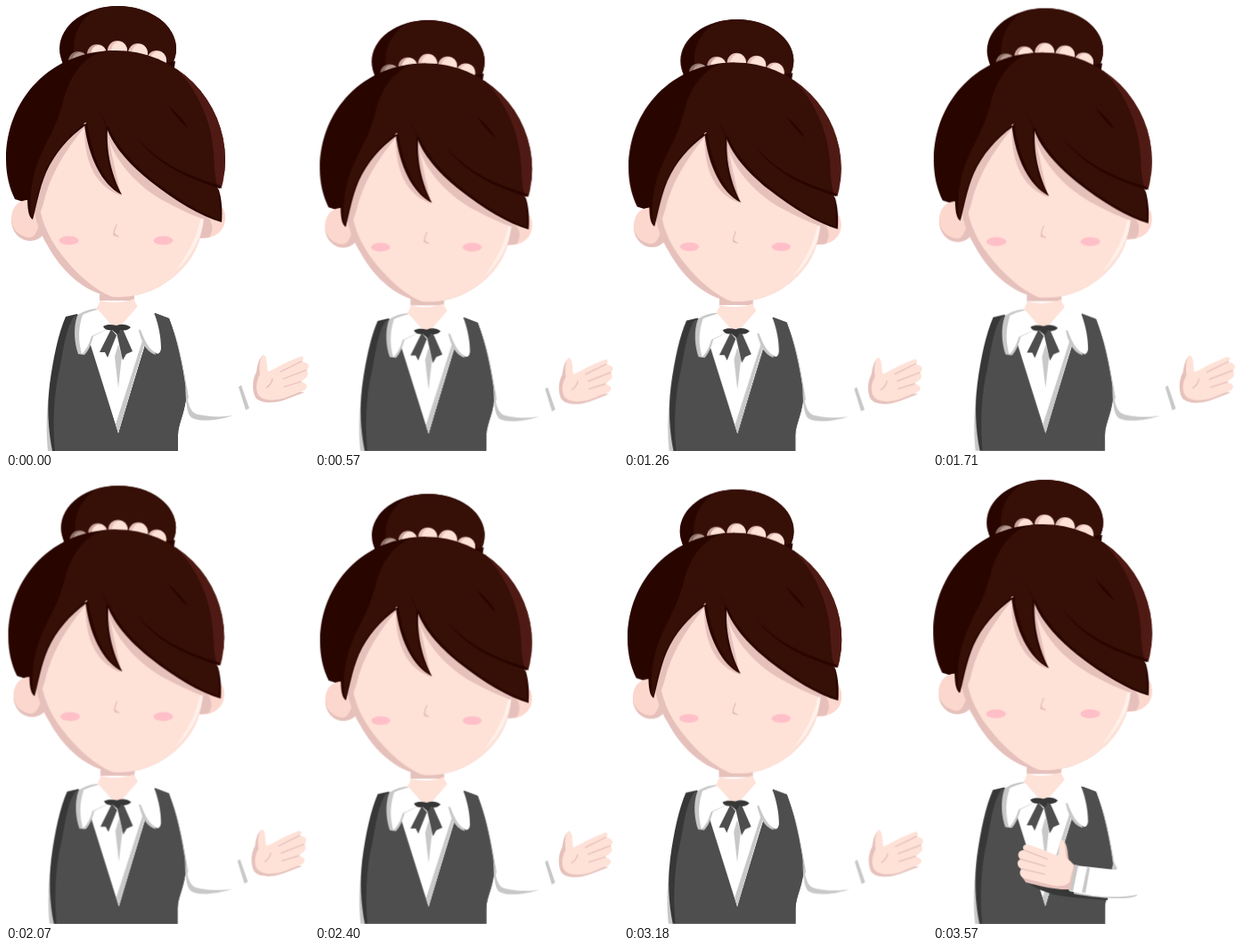
These frames come from a looping animation (340 by 500 pixels, 3600 ms). An HTML page:

```html
<!DOCTYPE html>
<html lang="en">
<head>
<meta charset="utf-8">
<title>Welcoming hostess</title>
<style>
  html, body { margin: 0; width: 100%; height: 100%; overflow: hidden; background: #fff; }
  svg { display: block; width: 340px; height: 500px; }
  #figure { transform-origin: 170px 500px; }
  #chest { opacity: 0; }
  .hair { fill: #360f07; }
  .deep { fill: #290500; }
  .glow { fill: #501a14; }
  .skin { fill: #fee1d7; }
  .ear { fill: #fcd7ce; }
  .blush { fill: #e6c1bc; }
  .vest { fill: #4e4e4e; }
  .dark { fill: #373737; }
  .white { fill: #fff; }
  .grey { fill: #c8c8c8; }
  .line { fill: none; stroke: #e6c1bc; stroke-width: 1.3; stroke-linecap: round; }
</style>
</head>
<body>
<svg viewBox="0 0 340 500">
  <defs>
    <clipPath id="bunClip"><ellipse cx="125.5" cy="48" rx="65.5" ry="48"/></clipPath>
    <clipPath id="headClip"><circle cx="123" cy="173" r="123"/></clipPath>
    <clipPath id="faceClip"><path id="faceShape" d="M34 195C28 226 33 246 46 268C63 300 93 327 126 327C160 327 190 309 208 282C219 265 223 244 223 215L200 130H80Z"/></clipPath>
  </defs>
  <g id="figure">
    <!-- bun and beads -->
    <g clip-path="url(#bunClip)">
      <rect class="deep" x="55" width="140" height="100"/>
      <path class="hair" d="M108 0C86 10 75 29 76 50L84 75H180L192 62V0Z"/>
    </g>
    <path class="deep" d="M62 58L66 74L82 66L75 52Z"/>
    <path class="deep" d="M178 64L190 62L188 75L174 69Z"/>
    <g id="beads"></g>

    <!-- back hair -->
    <path class="deep" d="M123 50C50 50 0 105 0 172C0 190 4 205 10 217L35 225L110 70Z"/>

    <!-- ears -->
    <ellipse class="blush" cx="27" cy="241" rx="21" ry="23"/>
    <path class="ear" d="M24 218C11 219 6 229 6 240C7 251 14 258 25 260C33 261 34 252 37 248L30 220Z"/>
    <path class="ear" d="M225 222C239 218 246 226 246 238C246 253 234 262 217 261Z"/>
    <path class="blush" d="M222 232C232 240 234 251 228 260L216 261Z"/>

    <!-- face and neck -->
    <path class="blush" d="M105 318H144V331H105Z"/>
    <use href="#faceShape" class="blush"/>
    <g clip-path="url(#faceClip)">
      <path class="skin" d="M36 215C39 240 46 258 62 279C80 302 100 320 122 328H170L240 260V120H60Z"/>
      <path fill="#fff1ea" d="M223 236C219 263 206 284 190 298C203 280 214 261 218 240Z"/>
      <path class="blush" d="M89 135C67 162 50 188 42 222L34 245L22 230L60 130ZM88 134C87 174 100 203 129 213L114 145ZM112 136C117 172 150 206 183 222C205 234 229 243 242 246L235 200L118 130Z"/>
    </g>
    <path class="line" d="M124 246C122 250 121 254 121 257L126 259"/>
    <path class="blush" d="M121 254L126 259.5L120.500 258Z"/>
    <g fill="#ffbfc8">
      <ellipse cx="70.500" cy="263.500" rx="11" ry="5"/>
      <ellipse cx="176.500" cy="263.500" rx="11" ry="5"/>
    </g>

    <!-- front hair -->
    <g clip-path="url(#headClip)">
      <path class="hair" d="M123 48C93 50 72 73 64 108C57 137 40 165 31 191L60 150L89 131L114 137L180 180L240 205L250 170L230 60Z"/>
    </g>
    <path class="deep" d="M62 112C50 143 27 168 24 214C24 227 25 237 30 240C34 226 37 206 45 187C55 165 70 148 89 134Z"/>
    <path class="hair" d="M62 113C55 145 33 164 28 209C27 225 27 235 30 238C33 224 36 205 44 186C54 164 69 147 88 132L95 112Z"/>
    <path class="deep" d="M88 133C92 168 107 201 130 212C120 193 112 166 114 137L106 120Z"/>
    <path class="hair" d="M91 130C95 165 109 197 127 209C117 191 110 165 112 134L104 116Z"/>
    <path class="deep" d="M113 137C121 160 143 182 162 197C190 219 218 236 242 243C243 230 242 217 239 207L150 110Z"/>
    <path class="hair" d="M114 133C123 157 145 180 164 195C191 216 218 233 240 240C240 228 240 214 238 205L150 105Z"/>
    <g clip-path="url(#headClip)">
      <path class="glow" d="M186 66C214 90 231 130 233 165C234 180 234 194 238 203L243 206L255 170L230 70Z"/>
    </g>
    <path class="deep" d="M146 147C173 178 203 190 241 202L240 205C205 194 171 180 146 147ZM182 112C190 119 199 127 204 137C195 130 188 121 182 112Z"/>

    <!-- shirt and vest -->
    <path class="grey" d="M48 435C45 460 45 482 47 500H56V435Z"/>
    <path class="grey" d="M184 355C194 375 199 405 205 440L199 450Z"/>
    <path class="dark" d="M67 349L80 346L126 480L167 345L183 351C191 372 198 402 202 433C203 454 193 468 193 482V500H52C47 475 46 450 49 425C53 395 59 367 67 349Z"/>
    <path class="vest" d="M76 349L84 346L126 480L167 345L183 351C191 372 198 402 202 433C203 454 193 468 193 482V500H55C52 470 54 439 58 418C64 394 65 367 76 349Z"/>
    <path class="white" d="M92 364L126 480L160 364L140 352H108Z"/>
    <path class="grey" d="M160 364L126 480L123 470L155 370ZM126 380L130 394L126 429L122 394Z"/>
    <path class="skin" d="M105 331C117 334 132 334 144 329V331L149 340L129 360H119L101 341L105 333Z"/>
    <path class="grey" d="M101 340C92 341 84 344 80 348C75 362 77 380 81 391L88 392C93 387 96 379 98 371L120 360Z"/>
    <path class="white" d="M103 341C95 343 90 345 86 347C81 362 81 376 85 391C91 386 94 377 96 371L120 360Z"/>
    <path class="grey" d="M148 360C151 376 156 388 168 392L160 365Z"/>
    <path class="white" d="M148 337C157 341 164 344 167 347C172 361 174 374 174 385C173 391 170 392 167 389C159 384 155 374 151 364L128 360Z"/>
    <path class="vest" d="M118 363L105 389L111 389L114 395L124 370ZM124 367L131 398L135 391L142 388L131 363Z"/>
    <path class="dark" d="M109 360C114 357 119 358 124 359C129 357 135 357 140 361C136 365 132 365 129 364L125 369L119 364C115 365 111 364 109 360Z"/>

    <!-- open arm -->
    <g id="open">
      <path class="grey" d="M201 424C204 444 205 457 216 459C229 462 244 462 255 460C240 465 220 468 209 463C202 459 202 442 201 424ZM261 428L264 426L273 452L269 454Z"/>
      <path class="blush" d="M289 392C283 396 282 405 281 411C276 420 276 432 280 440C287 448 304 446 314 442L335 434L300 430L288 410Z"/>
      <path class="skin" d="M289 392C294 394 292 404 294 411C302 408 310 402 318 399L330 394C334 393 335 397 332 399L337 401C341 403 340 407 337 409C340 412 339 416 336 418L331 422L335 424C339 426 338 430 334 432L314 440C302 444 290 444 284 438C279 431 281 421 285 414C284 407 284 395 289 392Z"/>
      <path class="line" d="M332 399L308 411M337 409L311 419M331 422L312 428M299 419C298 424 295 427 292 429"/>
    </g>

    <!-- hand on chest -->
    <g id="chest">
      <path class="dark" d="M101 450C119 464 137 468 158 470L196 473V465L155 457Z"/>
      <path class="grey" d="M203 430L207 438L200 440ZM158 461L194 465L229 464V468C218 473 194 472 158 466Z"/>
      <path class="white" d="M160 434L205 439L231 460L229 467C214 470 195 470 180 468L153 463Z"/>
      <path class="grey" d="M159 433L163 434L157 463L152 462ZM173 436L176 437L171 465L167 464Z"/>
      <path class="blush" d="M145 405C151 409 151 419 152 427L159 434L154 461C138 462 119 457 104 453L99 446L115 440L142 424Z"/>
      <path class="skin" d="M145 405C140 407 143 417 140 423C131 420 121 415 108 411C102 409 99 413 102 417C96 416 93 423 98 427C93 429 94 436 99 438C95 443 99 448 104 449L132 456C142 459 149 457 153 453L158 434L150 426C148 419 149 407 145 405Z"/>
      <path class="line" d="M102 417L128 427M98 427L126 435M99 438L125 444"/>
    </g>
  </g>
</svg>
<script>
  const el = id => document.getElementById(id);

  // [x, y, shade, face]
  const beads = [
    [81, 62, '#8c6f68', '#b69a92'],
    [169, 61, '#e6c1bc', '#fee1d7'],
    [102, 54, '#c9a49d', '#fee1d7'],
    [148, 53, '#e6c1bc', '#fee1d7'],
    [125, 50, '#e6c1bc', '#fee1d7']
  ];
  el('beads').innerHTML = beads.map(([x, y, shade, face]) =>
    `<circle cx="${x}" cy="${y}" r="11" fill="${shade}"/>` +
    `<ellipse cx="${x + 2}" cy="${y + 0.5}" rx="9" ry="10.500" fill="${face}"/>`).join('');

  const loop = (id, frames, duration) =>
    el(id).animate(frames, { duration, iterations: Infinity });

  const swap = (id, before, after) => loop(id, [
    { opacity: before, offset: 0 },
    { opacity: before, offset: 0.75 },
    { opacity: after, offset: 0.75 },
    { opacity: after, offset: 1 }
  ], 1200);

  // 30 ms steps down and back up
  loop('figure', [
    { transform: 'scale(1)', easing: 'steps(30)' },
    { transform: 'scale(0.95)', easing: 'steps(30)' },
    { transform: 'scale(1)' }
  ], 1800);
  swap('open', 1, 0);
  swap('chest', 0, 1);
</script>
</body>
</html>
```
